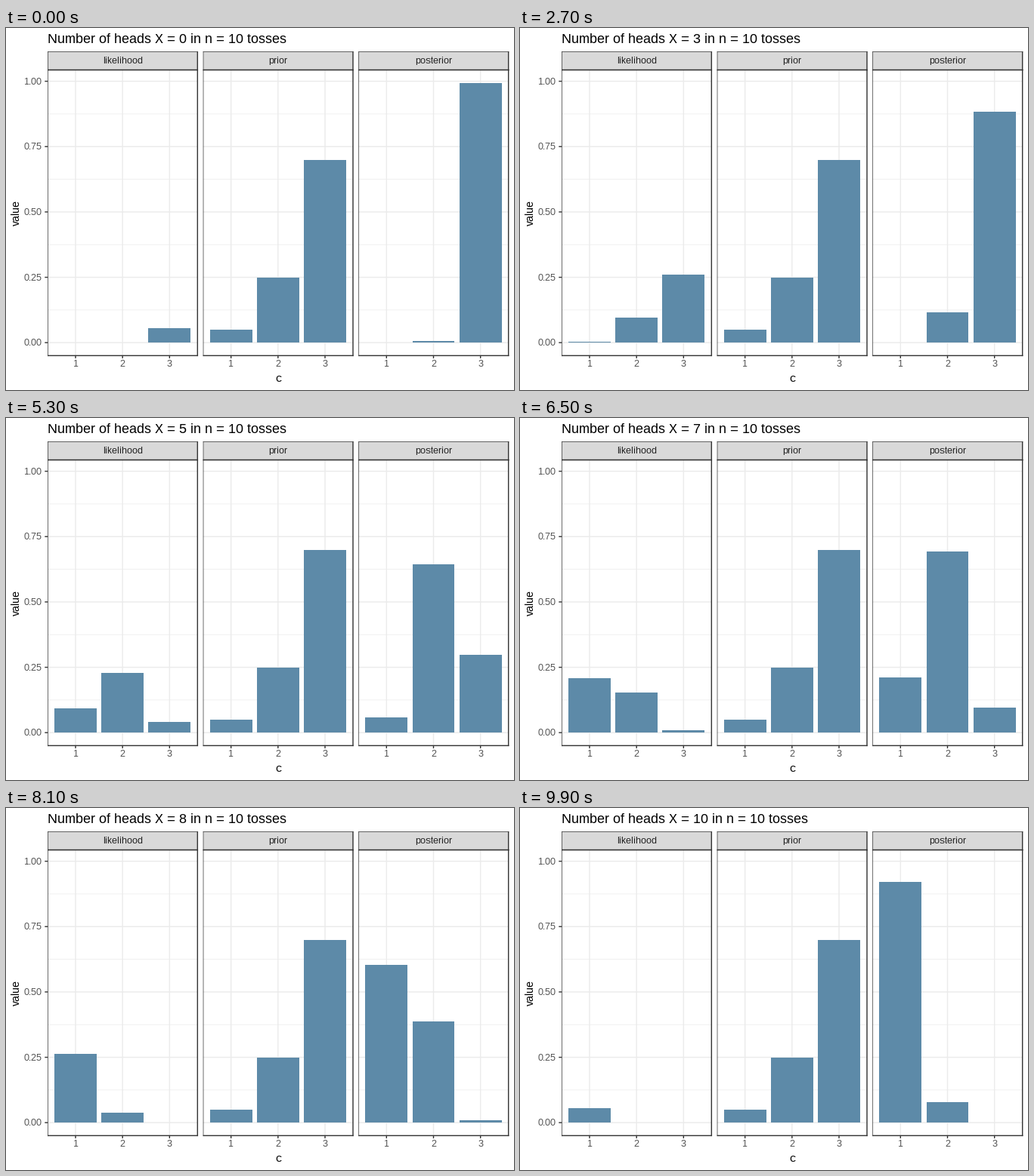
These frames come from a looping animation (672x480 px, 10 s). A matplotlib script:

```python
from math import comb

import matplotlib.pyplot as plt
import numpy as np
from matplotlib.animation import FuncAnimation
from matplotlib.patches import Rectangle

plt.rcParams.update({
    "font.family": "Liberation Sans",
    "text.hinting": "default",
    "text.hinting_factor": 1,
})

W, H, DPI = 672, 480, 96
FRAMES, INTERVAL = 100, 100
N = 10

# Panel geometry in pixels, y pointing down
LEFT, RIGHT, GAP = 55.0, 664.67, 7.33
STRIP_TOP, TOP, BOTTOM = 31.2, 55.5, 434.4
PANEL_W = (RIGHT - LEFT - 2 * GAP) / 3
Y0, Y_UNIT = 417.2, 346.6
X_UNIT = PANEL_W / 3.19
LINE = 1.42
HALF = LINE / 2
TICK = 3.67

BAR, GRID, EDGE, STRIP = "#5D8AA8", "#EBEBEB", "#333333", "#D9D9D9"


def bayes_table():
    """Likelihood, prior and posterior of three coins for each head count."""
    p = np.array([0.75, 0.5, 0.25])
    prior = np.array([0.05, 0.25, 0.7])
    rows = []
    for x in range(N + 1):
        like = comb(N, x) * p**x * (1 - p)**(N - x)
        joint = like * prior
        rows.append([like, prior, joint / joint.sum()])
    return np.array(rows)


TABLE = bayes_table()
# Frame nearest to each head count; the tie at 49.5 goes down
KEYS = np.ceil(np.arange(N + 1) * (FRAMES - 1) / N - 0.5).astype(int)


def values_at(frame):
    i = min(np.searchsorted(KEYS, frame, side="right") - 1, N - 1)
    t = (frame - KEYS[i]) / (KEYS[i + 1] - KEYS[i])
    return TABLE[i] + t * (TABLE[i + 1] - TABLE[i])


def px(v):
    return np.floor(v + 0.5)


fig = plt.figure(figsize=(W / DPI, H / DPI), dpi=DPI, facecolor="white")
ax = fig.add_axes([0, 0, 1, 1])
ax.set_xlim(0, W)
ax.set_ylim(H, 0)
ax.axis("off")


def box(x0, y0, x1, y1, color, z):
    patch = Rectangle((x0, y0), x1 - x0, y1 - y0, fc=color, lw=0,
                      snap=False, zorder=z)
    return ax.add_patch(patch)


def hline(x0, x1, y, color, z, width=LINE):
    box(x0, y - width / 2, x1, y + width / 2, color, z)


def vline(x, y0, y1, color, z, width=LINE):
    box(x - width / 2, y0, x + width / 2, y1, color, z)


def frame_box(x0, y0, x1, y1, z):
    """Border whose left and top strokes show only their inner half."""
    box(x0, y0, x0 + HALF, y1 + HALF, EDGE, z)
    box(x0, y0, x1 + HALF, y0 + HALF, EDGE, z)
    box(x1 - HALF, y0, x1 + HALF, y1 + HALF, EDGE, z)
    box(x0, y1 - HALF, x1 + HALF, y1 + HALF, EDGE, z)


def label(x, y, text, size, color="black", ha="center", **kw):
    return ax.text(x, y, text, fontsize=size, color=color, ha=ha,
                   va="baseline", zorder=6, **kw)


def value_y(v):
    return Y0 - v * Y_UNIT


def draw_panel(x0, name):
    x1 = x0 + PANEL_W
    for v in (0.125, 0.375, 0.625, 0.875):
        hline(x0, x1, value_y(v), GRID, 1, HALF)
    for v in (0, 0.25, 0.5, 0.75, 1):
        hline(x0, x1, value_y(v), GRID, 1)

    bars = []
    for c in (1, 2, 3):
        x = x0 + (c - 0.405) * X_UNIT
        vline(x, TOP, BOTTOM, GRID, 1)
        vline(x, BOTTOM, BOTTOM + TICK, EDGE, 3)
        label(x, 449, str(c), 8.8, "#4D4D4D")
        left, right = px(x - 0.45 * X_UNIT), px(x + 0.45 * X_UNIT)
        bars.append(box(left, px(Y0), right, px(Y0), BAR, 2))

    box(px(x0), px(STRIP_TOP), px(x1), px(TOP), STRIP, 3)
    frame_box(x0, STRIP_TOP, x1, TOP, 4)
    frame_box(x0, TOP, x1, BOTTOM, 4)
    label((x0 + x1) / 2, 47, name, 8.8, "#1A1A1A")
    return bars


panels = [draw_panel(LEFT + i * (PANEL_W + GAP), name)
          for i, name in enumerate(("likelihood", "prior", "posterior"))]

for v in (0, 0.25, 0.5, 0.75, 1):
    hline(LEFT - TICK, LEFT, value_y(v), EDGE, 3)
    label(48, value_y(v) + 4, f"{v:.2f}", 8.8, "#4D4D4D", ha="right")

label((LEFT + RIGHT) / 2, 469, "c", 11)
ax.text(18, (TOP + BOTTOM) / 2, "value", fontsize=11, rotation=90,
        rotation_mode="anchor", ha="center", va="baseline")
title = label(LEFT, 20, "", 13.2, ha="left")


def update(frame):
    heads = round(frame * N / (FRAMES - 1))
    title.set_text(f"Number of heads X = {heads} in n = {N} tosses")
    for bars, values in zip(panels, values_at(frame)):
        for bar, v in zip(bars, values):
            top = px(value_y(v))
            bar.set_y(top)
            bar.set_height(px(Y0) - top)
    return [title, *(bar for bars in panels for bar in bars)]


anim = FuncAnimation(fig, update, frames=FRAMES, interval=INTERVAL,
                     repeat=True, repeat_delay=0)
plt.show()
```
